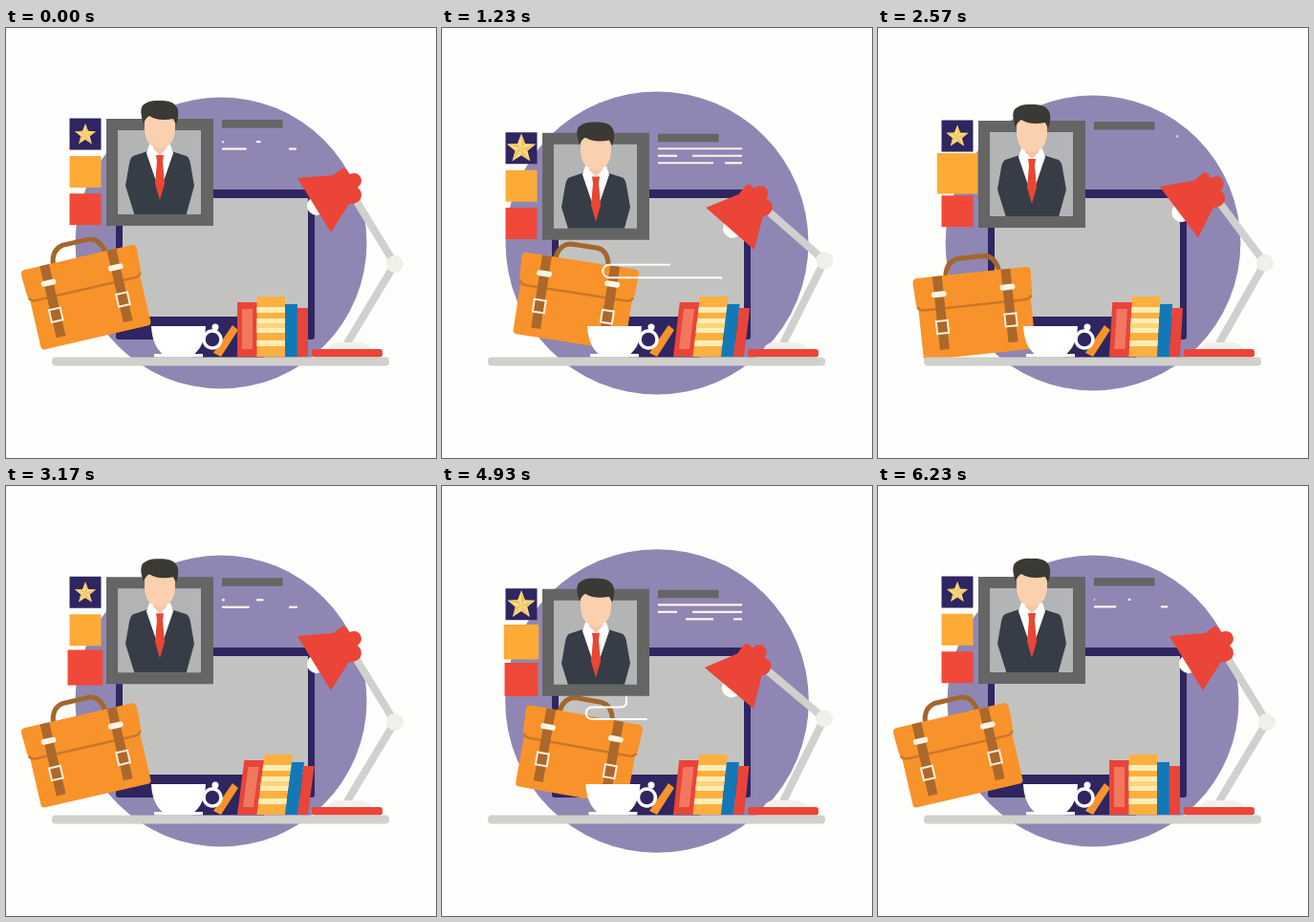
An HTML page that plays this animation: 450 by 450 pixels, repeating every 6260 ms.

```html
<!DOCTYPE html>
<html lang="en">
<head>
<meta charset="utf-8">
<title>Desk</title>
<style>
html, body { margin: 0; width: 100%; height: 100%; overflow: hidden; background: #fefefc; }
svg { display: block; width: 100vw; height: 100vh; }
</style>
</head>
<body>
<svg viewBox="0 0 450 450">
  <defs>
    <clipPath id="bustClip"><path d="M105 40H217V195H105Z"/></clipPath>
  </defs>
  <circle id="disc" cx="225" cy="225" r="152.5" fill="#9086b3"/>

  <g id="monitor">
    <path d="M195 320H270V346H195Z" fill="#2f2560"/>
    <rect x="115" y="169" width="208" height="157" rx="3" fill="#2f2560"/>
    <path d="M122 178H316V302H122Z" fill="#c2c3c1"/>
    <circle cx="219" cy="313" r="3.500" fill="#fff"/>
  </g>

  <g id="bag">
    <path d="M-27-42Q-25-57-13-59H15Q26-58 29-43" fill="none" stroke="#a2672d" stroke-width="5"/>
    <path d="M-59-30H59L59 39Q59 43 55 43H-55Q-59 43-59 39Z" fill="#f8932b"/>
    <path d="M-57-43H57Q62-43 62-38L61-16Q60-9 54-9H-54Q-60-9-61-16L-62-38Q-62-43-57-43Z" fill="#f8932b"/>
    <path d="M-60-13Q-58-9-53-9H53Q58-9 60-13" fill="none" stroke="#cb7628" stroke-width="2.500"/>
    <g id="strap">
      <path d="M-41-43H-31V34H-41Z" fill="#ac682b"/>
      <rect x="-44" y="-27" width="16" height="6" rx="3" fill="#fbf4e2"/>
      <rect x="-42" y="4" width="12" height="13" fill="#ac682b" stroke="#fbf0dc" stroke-width="2"/>
    </g>
    <use href="#strap" x="72"/>
  </g>

  <path id="thread" fill="none" stroke="#fff" stroke-width="2"
    d="M190 264.5H290a6.75 6.75 0 0 0 0-13.5H175a6.75 6.75 0 0 1 0-13.5H260a6.75 6.75 0 0 0 0-13.5H157a6.25 6.25 0 0 1 0-12.5H187q6 0 6-6V80"/>

  <g id="wall">
    <g id="tiles">
      <g>
        <path d="M-16.5-16.5H16.5V16.5H-16.5Z" fill="#2f2560"/>
        <g id="star"><path id="starFill" fill="#fbdb83"/><path id="starShade" fill="#eec566"/></g>
      </g>
      <path d="M-16.5-16.5H16.5V16.5H-16.5Z" fill="#fdab36"/>
      <path d="M-16.5-16.5H16.5V16.5H-16.5Z" fill="#f0493a"/>
    </g>
    <path d="M105 95H217V207H105Z" fill="#656565"/>
    <path d="M117 107H204V195H117Z" fill="#b3b4b5"/>
    <g clip-path="url(#bustClip)">
      <g id="bust">
        <path d="M148 129L133 134Q130 136 129 142L125 165L134 194L136 240H187L189 194L197 165L193 142Q192 136 189 134L173 129Z" fill="#373d46"/>
        <path d="M150 122H172L175 131L161 172L147 131Z" fill="#fff"/>
        <path d="M157 133H165L164 140L166 163L161 180L156 163L158 140Z" fill="#ea4535"/>
        <path d="M154 112H168V126L161 133L154 126Z" fill="#f3c6a4"/>
        <path d="M145 92H177V106Q176 125 161 126Q146 125 145 106Z" fill="#fbd0ae"/>
        <path d="M144 100Q139 86 143 81Q149 75 161 76Q177 75 180 86Q181 93 178 101L175 95Q159 98 150 92Q146 94 144 100Z" fill="#3a3933"/>
      </g>
    </g>
    <path d="M226 96H289.5V104.5H226Z" fill="#656565"/>
    <g id="text" stroke="#fdf3ee" stroke-width="2.2"></g>
  </g>

  <path d="M237 311L243 316L225 344L217 340Z" fill="#f8932b"/>
  <g id="cup">
    <circle cx="216" cy="326" r="9" fill="none" stroke="#fff" stroke-width="3.500"/>
    <path d="M152 312H209Q208 333 196 342H165Q153 333 152 312Z" fill="#fff"/>
    <path d="M155 341H206V344.500H155Z" fill="#fff"/>
  </g>

  <g id="books">
    <path d="M242-57H263V0H242Z" fill="#e9443a"/>
    <path d="M247-50H258V-8H247Z" fill="#f2775f"/>
    <path d="M262.500-63H292V0H262.500Z" fill="#fdb03f"/>
    <path d="M262.500-52H292V-46H262.500ZM262.500-40H292V-25H262.500ZM262.500-17H292V-11H262.500Z" fill="#feedb4"/>
    <path d="M262.500-35H292V-30H262.500Z" fill="#fdd47c"/>
    <path d="M292-55H305V0H292Z" fill="#1279b6"/>
    <path d="M305-51H316V0H305Z" fill="#e9443a"/>
  </g>

  <path id="lowerArm" stroke="#d0d0cf" stroke-width="8"/>
  <g id="upperArm">
    <path d="M0 0L-41-67" stroke="#d0d0cf" stroke-width="8"/>
    <circle cx="-82" cy="-61" r="10" fill="#fffdf4"/>
    <path transform="translate(-407 -247)" fill="#ea4537" d="M305 157L342 154L352 147Q357 146 359 153Q368 150 371 156Q374 162 368 167Q374 172 371 179Q367 185 359 184L340 214Z"/>
    <circle r="9" fill="#f0f0e8"/>
  </g>
  <path d="M345 329H371Q380 330 383 337H336Q338 331 345 329Z" fill="#f1f1ea"/>
  <rect x="320" y="336" width="74" height="8.500" rx="3" fill="#ea4537"/>
  <rect x="48" y="344.500" width="353" height="9" rx="4" fill="#d0d0cd"/>
</svg>
<script>
const LOOP = 6260, SWING = LOOP / 2, SWAY = LOOP / 3;
const $ = id => document.getElementById(id);
const put = (el, transform) => el.setAttribute('transform', transform);
const wave = (t, period) => (1 - Math.cos(2 * Math.PI * t / period)) / 2;
const progress = (t, start, duration) => Math.min(1, Math.max(0, (t - start) / duration));

// A smooth bump around a centre time, 0 outside its half width.
function bump(t, centre, half) {
  const d = Math.abs(t - centre) / half;
  return d < 1 ? Math.cos(d * Math.PI / 2) ** 2 : 0;
}

function drawStar() {
  const points = Array.from({ length: 10 }, (_, i) => {
    const r = i % 2 ? 0.43 : 1, a = i * Math.PI / 5;
    return [r * Math.sin(a), -r * Math.cos(a)];
  });
  const polygon = pts => 'M' + pts.map(p => p.map(v => v.toFixed(3)).join(' ')).join('L') + 'Z';
  const facets = [0, 2, 4, 6, 8].map(i => polygon([[0, 0], points[i], points[i + 1]]));
  $('starFill').setAttribute('d', polygon(points));
  $('starShade').setAttribute('d', facets.join(''));
}

// Caption strokes by row, each with its left and right end.
const strokes = [[0, 226, 314], [1, 226, 246], [1, 262, 314], [2, 226, 284], [2, 296, 314]].map(([row, left, right]) => {
  const el = document.createElementNS('http://www.w3.org/2000/svg', 'path');
  $('text').appendChild(el);
  return { el, row, left, right };
});

// Every stroke is written and then wiped from left to right; lower rows run ahead.
function drawCaption(t) {
  for (const { el, row, left, right } of strokes) {
    const clock = (t + 265 * row) % SWING, width = right - left;
    const from = left + width * progress(clock, 2080, 500);
    const to = left + width * progress(clock, 200, 750);
    el.setAttribute('d', to - from > 0.3 ? `M${from} ${111.5 + 7.5 * row}H${to}` : '');
  }
}

// A dash travels up the winding thread while the thread sinks.
function drawThread(phase) {
  const tail = 0.51 * (phase - 1000), start = Math.max(0, tail), length = tail + 203 - start;
  const el = $('thread');
  el.style.display = length > 0.5 ? '' : 'none';
  el.setAttribute('stroke-dasharray', `0 ${start} ${Math.max(0, length)} 2000`);
  put(el, `translate(0 ${20 * Math.sin(progress(phase, 940, 860) * Math.PI / 2)})`);
}

const tiles = [...$('tiles').children];
const tilePulses = [1500, 600, 930];

function render(t) {
  const phase = t % SWING, sway = t % SWAY;
  const u = wave(t, SWING), drop = wave(t + 165, SWING), nod = wave(t + 120, SWING);

  $('disc').setAttribute('r', 152.5 + 6.7 * u);
  put($('bag'), `translate(${85 + 60.5 * u} ${302 - 89.7 * (u - 0.4725) ** 2}) rotate(${-13 + 24.5 * u})`);
  drawThread(phase);

  const fall = 15.6 * drop - 0.4;
  put($('wall'), `translate(0 ${fall})`);
  put($('bust'), `translate(0 ${24 * nod - fall - 0.3})`);
  put($('star'), `translate(0 0.7) scale(${11.5 + 4.5 * drop})`);
  tiles.forEach((tile, i) => {
    put(tile, `translate(83 ${111 + 39.4 * i}) scale(${1 + 0.65 * bump(sway, tilePulses[i], 215)})`);
  });
  drawCaption(t);

  put($('cup'), `translate(${-2 * bump(phase, 1930, 450)} ${-9 * bump(phase, 940, 260)})`);
  put($('books'), `matrix(1 0 ${-0.13 * wave(t, SWAY)} 1 0 344)`);

  const elbow = `${407 - 7.4 * u} ${247 - 4 * u}`;
  $('lowerArm').setAttribute('d', `M357 330L${elbow}`);
  put($('upperArm'), `translate(${elbow}) rotate(${-19.5 * u})`);
}

drawStar();
const begin = performance.now();
function tick() {
  render((performance.now() - begin) % LOOP);
  requestAnimationFrame(tick);
}
render(0);
requestAnimationFrame(tick);
</script>
</body>
</html>
```
